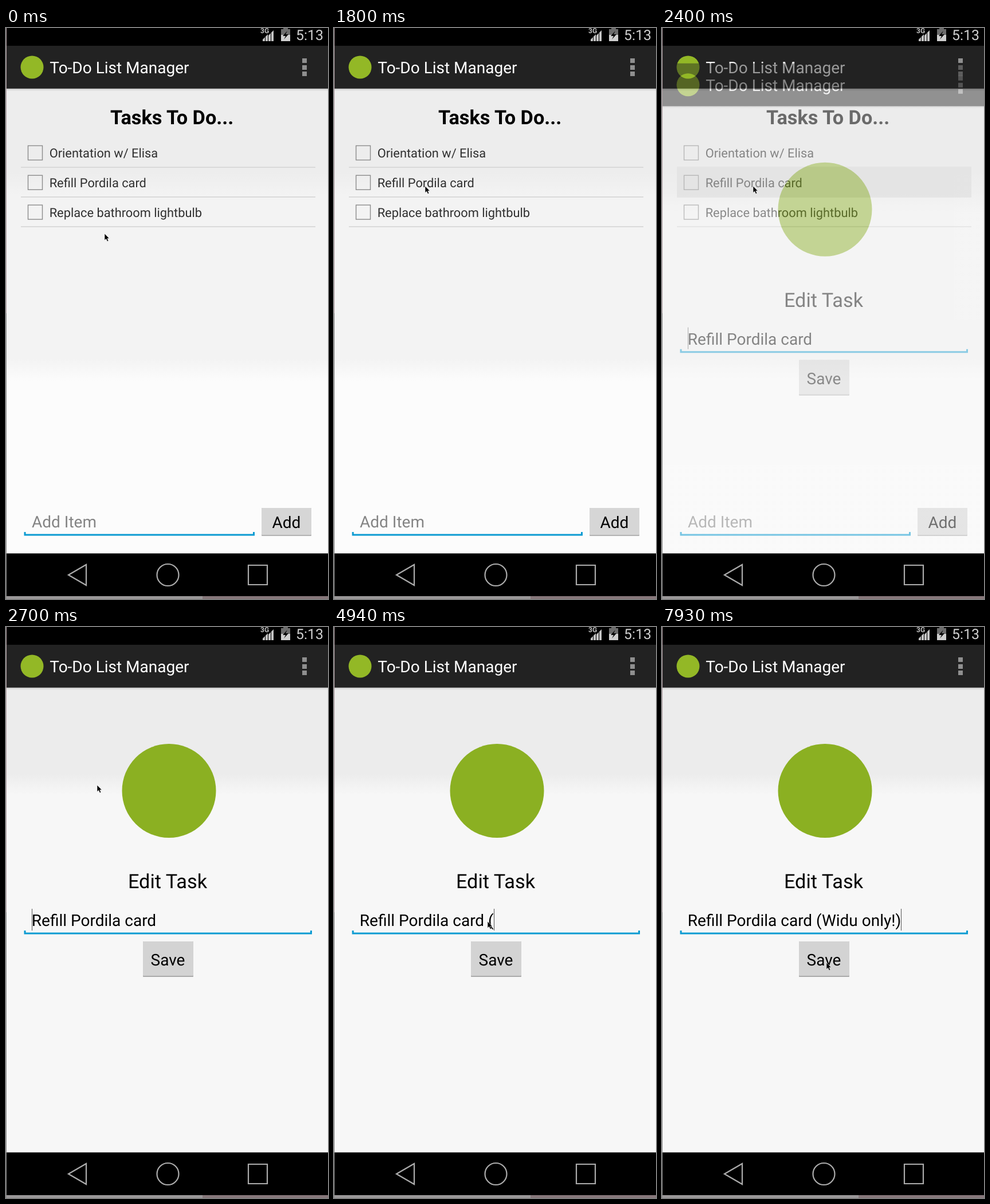
An HTML page that plays this animation: 562 by 997 pixels, repeating every 8000 ms.

```html
<!DOCTYPE html>
<html lang="en">
<head>
<meta charset="utf-8">
<title>To-Do List Manager</title>
<style>
  html, body { margin: 0; width: 100%; height: 100%; overflow: hidden; background: #000; }
  svg { display: block; width: 562px; height: 997px; }
  text { font: 28px Roboto, sans-serif; text-rendering: geometricPrecision; white-space: pre; }
  .row text { font-size: 21.8px; fill: #303030; }
  .heading { font-size: 34.3px; }
  .bold { font-weight: 700; }
  .hint { fill: #848484; }
  .line { fill: none; stroke: #0c9bd2; stroke-width: 3; }
  .nav { fill: none; stroke: #acacac; stroke-width: 2.2; }
</style>
</head>
<body>
<svg viewBox="0 0 562 997">
  <defs>
    <linearGradient id="listShade" gradientUnits="userSpaceOnUse" x1="0" y1="106" x2="0" y2="918">
      <stop offset=".18" stop-color="#ededed"/><stop offset=".23" stop-color="#f3f3f3"/>
      <stop offset=".58" stop-color="#f3f3f3"/><stop offset=".63" stop-color="#fcfcfc"/>
    </linearGradient>
    <linearGradient id="editShade" gradientUnits="userSpaceOnUse" x1="0" y1="106" x2="0" y2="918">
      <stop offset=".185" stop-color="#ececec"/><stop offset=".23" stop-color="#f7f7f7"/>
    </linearGradient>
    <linearGradient id="barShadow" x2="0" y2="1">
      <stop stop-color="#c2c2c2"/><stop offset="1" stop-color="#ececec"/>
    </linearGradient>
    <g id="appBar">
      <rect x="1" y="105" width="561" height="5" fill="url(#barShadow)"/>
      <rect x="1" y="31" width="561" height="74.8" fill="#222"/>
      <circle cx="45.5" cy="68.5" r="20" fill="#93b826"/>
      <text x="76.3" y="79" fill="#fff">To-Do List Manager</text>
      <path d="M517 53h8v8h-8zM517 65h8v8h-8zM517 76h8v8h-8z" fill="#8f8f8f"/>
    </g>
  </defs>

  <g id="list">
    <rect x="1" y="106" width="561" height="812" fill="url(#listShade)"/>
    <use href="#appBar"/>
    <text class="heading bold" x="182" y="168">Tasks To Do...</text>
    <g id="rows"></g>
    <text class="hint" x="45" y="872">Add Item</text>
    <path class="line" d="M33 880v5H432.5V880"/>
    <rect x="446" y="838" width="87" height="49" rx="1" fill="#b2b2b2"/>
    <rect x="446" y="838" width="87" height="47" rx="1" fill="#d6d6d6"/>
    <text x="489.5" y="873" text-anchor="middle">Add</text>
    <rect id="listCaret" x="45" y="841" width="1" height="39" fill="#777"/>
  </g>

  <g id="edit">
    <rect x="1" y="106" width="561" height="812" fill="url(#editShade)"/>
    <use href="#appBar"/>
    <circle cx="284.5" cy="286" r="82" fill="#8bb022"/>
    <text class="heading" x="282" y="456" text-anchor="middle">Edit Task</text>
    <text id="field" x="44.8" y="522"></text>
    <path class="line" d="M33 530v5H532.5V530"/>
    <rect x="239" y="549" width="88" height="62" rx="1" fill="#aaa"/>
    <rect x="239" y="549" width="88" height="60" rx="1" fill="#d3d3d3"/>
    <text x="282.5" y="591" text-anchor="middle">Save</text>
    <rect id="editCaret" y="492" width="1" height="38" fill="#555"/>
    <g id="handle">
      <rect x="243" y="556" width="42" height="39" rx="5" fill="#000" opacity=".12"/>
      <path d="M264 536L284 553V588Q284 592 280 592H248Q244 592 244 588V553Z" fill="#2196d3" opacity=".65"/>
    </g>
  </g>

  <rect width="562" height="31"/>
  <text class="bold" x="444" y="9" fill="#c4c4c4" style="font-size:12px">3G</text>
  <path d="M448 23V20L452 16V23ZM453 23V15L457 11V23ZM458 23V13L462 9V23ZM463 23V8L467 4V23Z" fill="#c4c4c4"/>
  <path d="M480 2h4V0h8v2h4V12H480Z" fill="#6c6c6c"/>
  <rect x="480" y="12" width="16" height="11" fill="#cfcfcf"/>
  <path d="M491 5L483 14H488L485 20L493 11H488Z"/>
  <text x="506" y="21" fill="#cfcfcf" style="font-size:24.9px">5:13</text>

  <rect x="1" y="917.4" width="561" height="75"/>
  <path class="nav" d="M109 955L140 937V973ZM423 938H456V972H423Z"/>
  <circle class="nav" cx="282.5" cy="955" r="19"/>
  <rect y="992" width="343" height="5" fill="#9a9798"/>
  <rect x="343" y="992" width="219" height="5" fill="#86777a"/>
  <rect width="1" height="498" fill="#b7a4aa"/>
  <rect y="498" width="1" height="499" fill="#8f8f8f"/>

  <path id="mouse" d="M0 0V11.6L2.7 9.2L4.7 13.6L6.8 12.7L4.9 8.4H8.3Z" stroke="#fff" stroke-width=".6"/>
</svg>
<script>
const $ = id => document.getElementById(id);
const LOOP = 8000, STEP = 150;
const TASK = "Refill Pordila card";
const ADDED = " (Widu only!)";

$("rows").innerHTML = ["Orientation w/ Elisa", TASK, "Replace bathroom lightbulb"].map((label, i) => `
  <g class="row" transform="translate(0 ${i * 51.8})">
    <rect x="26" y="242.5" width="514" height="1.6" fill="#d4d4d4"/>
    ${i === 1 ? '<rect id="press" x="26" y="191" width="514" height="53" fill="#dedede"/>' : ""}
    <rect x="38.5" y="205.5" width="25" height="25" fill="none" stroke="#8c8c8c" stroke-width="1.4"/>
    <text x="75.7" y="226">${label}</text>
  </g>`).join("");

// Each track holds [time, value] pairs; a value stays until the next pair.
const at = (track, t) => track.filter(([time]) => time <= t).pop()[1];

const typed = [[0, 0], [4650, 1], [4800, 2], [5090, 3], [5380, 4], [5530, 5], [5680, 6],
  [5830, 7], [6130, 9], [6280, 10], [6580, 11], [6730, 12], [6880, 13]];
const caretOn = [[0, 0], [300, 1], [750, 0], [1350, 1], [1800, 0], [2400, 1], [3000, 0],
  [3450, 1], [4350, 0], [4650, 1], [7330, 0], [7780, 1]];

// Pointer moves: start, number of steps, destination.
const moves = [[150, 5, 159, 276], [2850, 4, 277, 510], [3450, 1, 268, 514],
  [4950, 1, 275, 514], [7330, 5, 287, 586]];

function pointer(t) {
  let x = 172, y = 359;
  for (const [start, steps, toX, toY] of moves) {
    if (t < start) break;
    const p = Math.min(1, (Math.floor((t - start) / STEP) + 1) / steps);
    const ease = p * p * (3 - 2 * p);
    x += (toX - x) * ease;
    y += (toY - y) * ease;
  }
  return [x, y];
}

const show = (id, on) => $(id).setAttribute("visibility", on ? "inherit" : "hidden");

function render(t) {
  const frame = Math.floor(t / STEP) * STEP;
  const open = Math.max(0, Math.min(1, (frame - 2310) / 350));
  const caret = at(caretOn, t);
  const count = at(typed, t);

  show("press", t >= 1950);
  show("listCaret", caret && t < 2400);

  show("edit", open > 0);
  $("edit").setAttribute("opacity", Math.min(1, open * 1.75));
  $("edit").setAttribute("transform", `translate(0 ${75 * (1 - open) ** 3})`);
  $("field").textContent = TASK + ADDED.slice(0, count);
  const end = Math.round(45 + $("field").getComputedTextLength());
  $("editCaret").setAttribute("x", t < 3900 ? 45 : end);
  show("editCaret", caret);
  show("handle", t >= 3900 && t < 4650);

  $("mouse").setAttribute("transform", `translate(${pointer(t)})`);
}

function tick(now) {
  render(now % LOOP);
  requestAnimationFrame(tick);
}
render(0);
requestAnimationFrame(tick);
</script>
</body>
</html>
```
